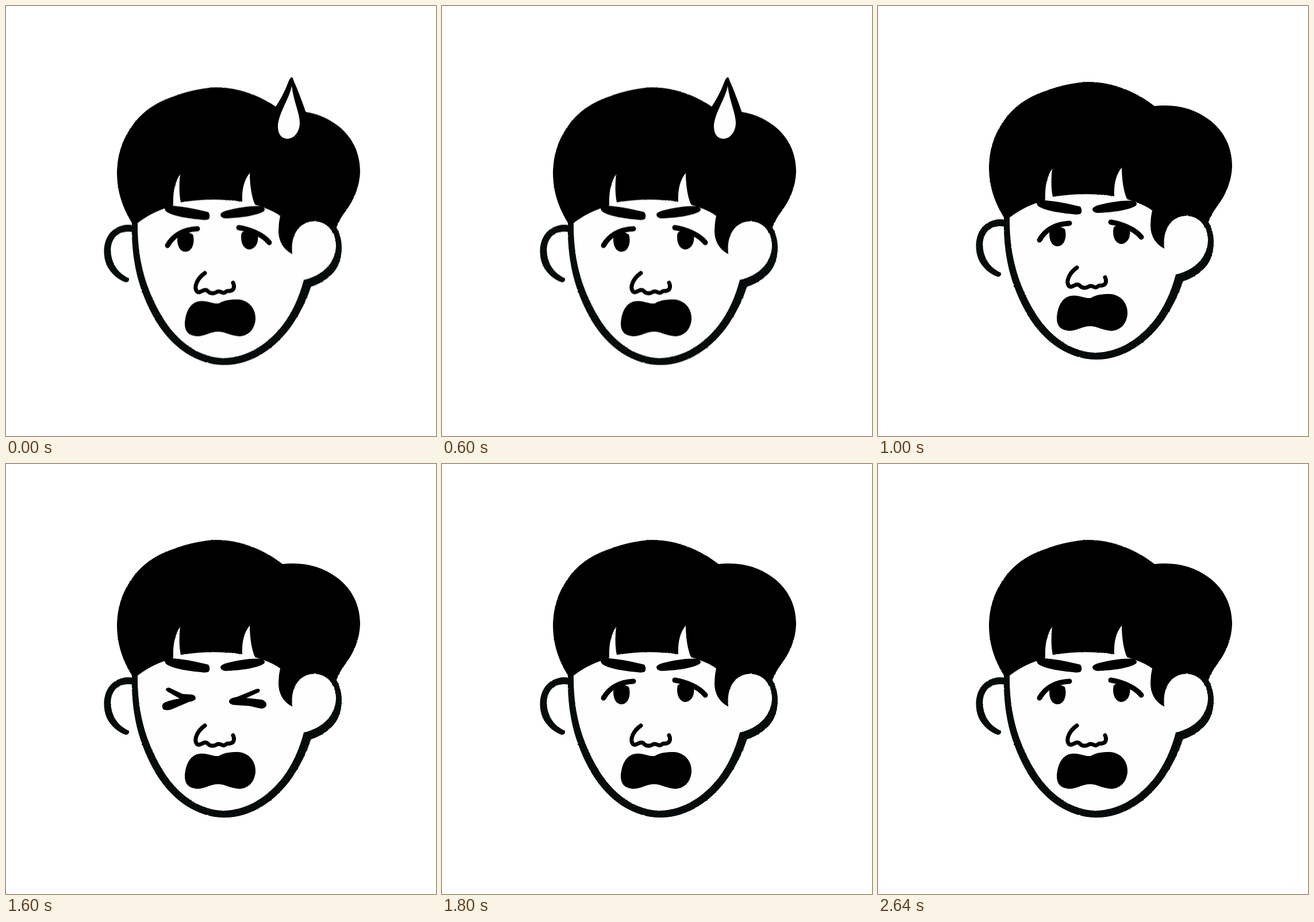
Animation, 748 px wide and 748 px high, one loop 3200 ms. Source, as an HTML page:

```html
<!DOCTYPE html>
<html lang="en">
<head>
<meta charset="utf-8">
<title>Shocked face</title>
<style>
  html, body { margin: 0; width: 100%; height: 100%; overflow: hidden; background: #fff; }
  svg { display: block; width: 100%; height: 100%; }
  .line { fill: none; stroke: #000; stroke-linecap: round; stroke-linejoin: round; }
  .skin { fill: #fefefe; }
  .ink { fill: #060b0c; }
  .head, .sweat, .open, .shut { animation: 3200ms step-end infinite; }
  .head { animation-name: jump; }
  .sweat { animation-name: sweat; }
  .open { animation-name: open; }
  .shut { animation-name: shut; }
  @keyframes jump { 0% { transform: translateY(9.5px); } 31.25%, 100% { transform: none; } }
  @keyframes sweat { 0% { visibility: visible; } 31.25%, 100% { visibility: hidden; } }
  @keyframes open { 0%, 56.25%, 100% { visibility: visible; } 50% { visibility: hidden; } }
  @keyframes shut { 0%, 56.25%, 100% { visibility: hidden; } 50% { visibility: visible; } }
</style>
</head>
<body>
<svg viewBox="0 0 748 748">
  <defs>
    <filter id="rough" filterUnits="userSpaceOnUse" x="150" y="110" width="490" height="530" color-interpolation-filters="sRGB">
      <feTurbulence type="fractalNoise" baseFrequency=".3" numOctaves="2" seed="4"/>
      <feDisplacementMap in="SourceGraphic" scale="2" xChannelSelector="R" yChannelSelector="G"/>
    </filter>
  </defs>

  <g class="head">
    <g filter="url(#rough)">
      <!-- left ear -->
      <path class="ink" d="M222 372C206 368 188 375 179 388C169 402 168 424 175 441C182 456 196 467 208 471Q215 471 214 464C202 459 191 449 186 435C180 419 181 402 191 391Q202 380 222 384Z"/>
      <!-- face -->
      <path class="ink" d="M219 364C217 432 230 486 261 539C290 586 333 615 380 615C428 615 470 585 498 545Q519 514 531 478L521 464L229 364Z"/>
      <path class="skin" d="M229 364C228 428 241 479 271 530C298 576 338 603 380 603C421 602 457 577 481 546Q506 513 518 467L498 395L480 350L430 320L290 320Z"/>
      <!-- hair -->
      <path d="M220 369C203 342 193 314 193 279C194 248 202 225 216 204C235 175 259 159 291 148C315 139 340 133 365 132C408 132 449 149 481 174C518 170 549 178 575 197C602 217 616 245 616 279C615 306 605 328 591 347Q580 361 574 378L500 395L498 422C482 414 474 399 474 382Q474 368 477 355Q464 347 449 341L433 336C427 322 424 301 424 281C414 293 410 310 411 331Q358 323 304 332C301 317 301 300 303 283C293 297 290 318 291 338Q256 347 229 368Z"/>
      <!-- right ear -->
      <path class="ink" d="M572 372C585 389 588 417 578 441C570 459 550 473 530 479L518 468L545 400Z"/>
      <path class="skin" d="M498 422C494 388 511 365 537 365C561 366 574 386 574 408C573 439 549 460 518 467Z"/>
    </g>

    <!-- brows -->
    <path d="M276 342Q279 336 291 338C313 340 336 345 352 349Q356 355 353 361Q349 364 338 362C316 360 292 356 280 349Q276 346 276 342Z"/>
    <path d="M373 353Q374 349 385 346C405 341 430 337 446 339Q452 343 449 347C439 355 407 359 382 360Q373 359 373 353Z"/>

    <g class="open">
      <path class="line" stroke-width="9" d="M281 407C290 391 307 379 333 378"/>
      <path d="M299 389Q311 379 325 388C329 400 325 418 312 418C300 418 296 401 299 389Z"/>
      <path class="line" stroke-width="9" d="M405 376C424 379 447 388 458 402"/>
      <path d="M410 385Q425 374 438 387C440 401 435 413 423 414C411 413 407 397 410 385Z"/>
    </g>
    <g class="shut">
      <path d="M278 393Q278 389 284 389L307 400L323 401Q330 402 330 408Q329 412 318 414L290 426Q281 430 274 427Q270 422 273 417Q278 412 302 408L281 396Z"/>
      <path d="M441 392Q443 396 438 398L418 407L446 410Q454 414 453 420Q450 427 441 425L424 421L395 419Q387 417 388 412Q389 407 402 405L434 392Q439 390 441 392Z"/>
    </g>

    <!-- nose and mouth -->
    <path class="line" stroke-width="7" d="M346 455C333 464 326 479 332 487C337 492 343 482 349 485C352 486 353 491 359 490C365 491 365 487 370 487C375 487 378 492 382 488C386 485 386 487 390 486C397 485 398 478 395 472"/>
    <path d="M311 543C312 525 319 506 337 504C350 502 359 509 370 508C379 502 390 501 403 501C424 502 435 519 434 536C432 555 420 565 405 565C390 564 381 557 369 557C355 557 347 565 332 565C318 564 311 557 311 543Z"/>
  </g>

  <g class="sweat">
    <path d="M497 124Q494 124 490 135Q483 154 468 177L486 210L522 186Q510 151 500 129Q499 124 497 124Z"/>
    <path class="skin" d="M497 139C493 162 472 189 473 212C474 225 481 231 490 231C503 230 511 217 511 203C511 187 500 165 497 139Z"/>
  </g>
</svg>
</body>
</html>
```
